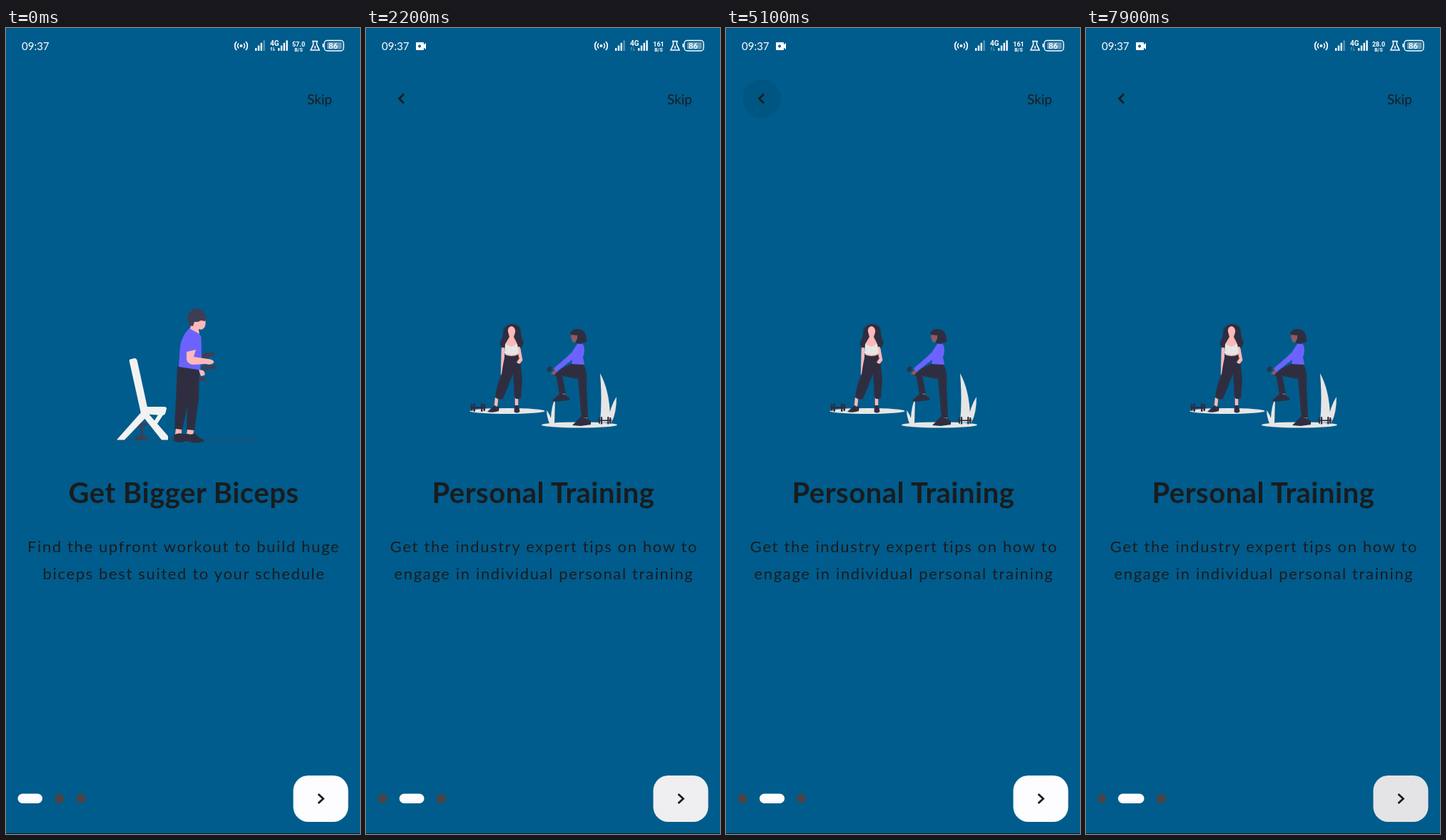
An HTML page that plays this animation: 496 px wide and 1130 px high, repeating every 8 s.

```html
<!DOCTYPE html>
<html lang="en">
<head>
<meta charset="utf-8">
<title>Workout onboarding</title>
<style>
html, body { margin: 0; width: 100%; height: 100%; overflow: hidden; background: #005c8c; }
svg { display: block; width: 100vw; height: 100vh; }
text { font-family: Lato, "Open Sans", sans-serif; fill: #191c1e; }
.title { font-size: 40px; font-weight: 700; letter-spacing: .5px; text-anchor: middle; }
.body { font-size: 22px; letter-spacing: 1.65px; text-anchor: middle; }
.light text { fill: #fff; }
.net text { font: 700 9px Roboto, Inter, sans-serif; }
</style>
</head>
<body>
<svg viewBox="0 0 496 1130" xmlns="http://www.w3.org/2000/svg">
  <defs>
    <g id="weight" fill="#2f2e41">
      <path d="M0 5h22v2H0z"/>
      <rect x="1" y="1" width="2.5" height="10" rx="1"/><rect x="4.5" width="2.5" height="12" rx="1"/>
      <rect x="15" width="2.5" height="12" rx="1"/><rect x="18.5" y="1" width="2.5" height="10" rx="1"/>
    </g>
  </defs>
  <rect width="496" height="1130" fill="#005c8c"/>

  <g id="page0">
    <path d="M147 577.5H351" stroke="#3f3d56" stroke-width=".8"/>
    <g fill="#3f3d56">
      <rect x="183" y="554" width="14" height="4" rx="1.5"/><path d="M188 557h3.5v17H188z"/>
      <rect x="181" y="572.5" width="17" height="5" rx="2"/>
    </g>
    <g fill="#f2f2f2">
      <path d="M173 468Q172 464 176 464L180 463Q183 463 184 467L199 536L189 540Z"/>
      <path d="M190 531H222Q225 531 225 534L223 541Q222 543 219 543L190 541Z"/>
      <path d="M190 538L200 542L166 577.500H155ZM189 541L199 540L227 572V577.500H218ZM214 541H221L210 558L205 555Z"/>
    </g>
    <path fill="#3f3d56" d="M274 459L277 456L290 454Q293 455 291 459L276 464ZM274 473L292 473Q296 474 293 478L275 480ZM270 489L279 490Q282 492 279 495L271 494Z"/>
    <path fill="#2f2e41" d="M240 474L271 479L270 520L264 564L253 563L254 530L247 563L236 562L239 500Z"/>
    <path fill="#ffb8b8" d="M262 410L279 407Q281 417 277 421Q274 424 270 422L271 430L257 423ZM238 562L246 563V570H237ZM254 563L263 564L262 571H253ZM270 479L276 480Q280 483 278 487L273 488Z"/>
    <path fill="#2f2e41" d="M235 571Q240 567 248 569L255 569Q259 571 265 568Q269 574 278 578Q277 582 262 581.500L252 579Q243 583 235 579Z"/>
    <path fill="#6c63ff" d="M257 421Q247 430 244 446L242 475L272 479.500L274 462L273.500 433L271 429Z"/>
    <path fill="#ffb8b8" d="M253 454L266 451L263 461L283 464Q292 465 291 469Q288 473 280 471L262 472Q252 471 253 460Z"/>
    <path fill="#3f3d56" d="M257 417L254 407Q256 394 267 393Q277 394 281 406L279 411L273 410L269 412L264 412L262 418Z"/>
    <text class="title" x="249" y="666">Get Bigger Biceps</text>
    <text class="body" x="249" y="735">Find the upfront workout to build huge</text>
    <text class="body" x="249.500" y="773">biceps best suited to your schedule</text>
  </g>

  <g id="page1">
    <g fill="#e6e6e6">
      <ellipse cx="198" cy="537" rx="52.500" ry="4"/><ellipse cx="299" cy="556.500" rx="53" ry="4"/>
      <path d="M328 484Q343 512 342 553H328Q331 520 328 484ZM351 517Q351 540 344 553H339Q342 530 351 517ZM265 520L264 556L257 554Q253 545 253 536Q258 542 259 547Q260 529 265 520Z"/>
    </g>
    <use href="#weight" x="146" y="526"/>
    <path fill="#2f2e41" d="M204 415Q215 414 217 425Q217 434 221 440Q219 451 211 450L196 449Q186 448 188 440Q193 431 192 425Q194 416 204 415Z"/>
    <g fill="none" stroke="#ffb8b8" stroke-width="4.500" stroke-linecap="round">
      <path d="M192 450L191 485M214 449L217 465L213 470M183 519L182 530M211 517V530"/>
    </g>
    <path fill="#ffb8b8" d="M199 426Q198 419 204 418Q210 420 209 427L207 433L212 443L213 460H195V443L201 433Z"/>
    <path fill="#e6e6e6" d="M195 443L204 447L212 443L214 456Q204 460 194 456Z"/>
    <path fill="#2f2e41" d="M195 458Q204 462 213 458Q218 473 219 493L217 519Q212 522 208 518L206 485L192 520Q186 522 181 518Q183 500 190 485Q192 470 195 458ZM170 538L180 529Q184 532 187 530L186 537Q178 540 170 538ZM208 529H214L215.500 538Q211 541 207.500 538Z"/>
    <path fill="#ffb8b8" d="M214 464L219 466L215 471L211 469Z"/>
    <g transform="rotate(35 261 481)"><use href="#weight" transform="translate(253 476.500) scale(.75)"/></g>
    <path fill="#8b5b62" d="M287 430H296V439L292 441Q287 440 287 430ZM259 484L266 477L269 481L263 487ZM272 509H279V515H272ZM302 543H310V550H302Z"/>
    <path fill="#2f2e41" d="M286 430Q287 421 298 422Q307 423 308 432L310 439Q302 444 293 441Q297 436 296 431Z"/>
    <path fill="#6c63ff" d="M296 443H304Q308 452 304 461L306 472L288 473L289 465L267 482L263 477Q280 463 288 455Z"/>
    <path fill="#2f2e41" d="M288 471L305 472Q311 483 309 500L311 546H302L297 492L275 488L280 512L271 513L266 485Q275 475 288 471ZM261 522L272 512L280 515L286 520L284 522L264 524ZM289 557L301 545L310 548L315 551V556L301 558Z"/>
    <use href="#weight" transform="translate(325 545) scale(.88)"/>
    <text class="title" x="248.500" y="666">Personal Training</text>
    <text class="body" x="249.500" y="735">Get the industry expert tips on how to</text>
    <text class="body" x="249.500" y="773">engage in individual personal training</text>
  </g>

  <circle id="backInk" cx="50" cy="99" r="27"/>
  <path id="back" d="M53 92.500L46.500 99L53 105.500" fill="none" stroke="#191c1e" stroke-width="2.700"/>
  <text x="422" y="107" font-size="19">Skip</text>

  <g class="light" fill="#fff">
    <text x="22" y="31" font-size="15">09:37</text>
    <path id="camera" fill-rule="evenodd" d="M71 20h9q1 0 1 1v2.500l3-2.500v9l-3-2.500V30q0 1-1 1h-9q-1 0-1-1v-9q0-1 1-1zM75 23.500a2 2 0 1 0 .1 0z"/>
    <g id="icons">
      <circle cx="329.500" cy="25" r="2"/>
      <path d="M326 21.500a5 5 0 0 0 0 7M333 21.500a5 5 0 0 1 0 7M323 19a9 9 0 0 0 0 12M336 19a9 9 0 0 1 0 12" fill="none" stroke="#fff" stroke-width="1.700"/>
      <g id="signal"></g>
      <g class="net">
        <text x="370" y="25" style="font-size:10px">4G</text>
        <text id="speed" x="410" y="25.500" text-anchor="middle"></text>
        <text x="410" y="33" text-anchor="middle" style="font-size:7px">B/S</text>
      </g>
      <path id="arrows" d="M372 32v-5l-1.500 2M375 27v5l1.500-2" fill="none" stroke="#fff"/>
      <path d="M429 18.500h8M430.500 19v4.500L427 31h12l-3.500-7.500V19M433 25v4" fill="none" stroke="#fff" stroke-width="1.600"/>
      <rect x="446" y="17.500" width="27" height="14.500" rx="4" fill="none" stroke="#fff" stroke-width="1.400"/>
      <rect x="443.500" y="22" width="1.500" height="5"/>
      <rect x="450" y="20" width="20.500" height="9.500" rx="1.500" opacity=".4"/>
      <text x="458.500" y="29" font-size="11" font-weight="700" text-anchor="middle">86</text>
    </g>
    <g id="mic">
      <rect id="micPill" y="13.500" height="22.500" rx="11.200" fill="#30c680"/>
      <g id="micIcon"><rect x="449.500" y="17" width="5" height="9" rx="2.500"/>
        <path d="M446.700 23.500a5.300 5 0 0 0 10.600 0M452 28.500v3.500" fill="none" stroke="#fff" stroke-width="1.500"/></g>
    </g>
  </g>

  <g id="dots"></g>
  <rect x="402.500" y="1048" width="77" height="65" rx="21" fill="#fdfcff"/>
  <rect id="nextInk" x="402.500" y="1048" width="77" height="65" rx="21"/>
  <path d="M437.500 1074L444.500 1080.500L437.500 1087" fill="none" stroke="#191c1e" stroke-width="2.800"/>
  <g id="touch" fill="#fff"><circle r="17" opacity=".1"/><circle r="14.500" opacity=".34"/></g>
  <path d="M0 1129.500H496" stroke="#06131c"/>
</svg>
<script>
const LOOP = 8000, WIDTH = 496;
const $ = id => document.getElementById(id);
const set = (el, attrs) => { for (const k in attrs) el.setAttribute(k, attrs[k]); };
const make = (parent, tag, attrs) => {
  const el = document.createElementNS('http://www.w3.org/2000/svg', tag);
  set(el, attrs);
  return parent.appendChild(el);
};
const show = (id, on) => set($(id), { opacity: +on });
const clamp = x => Math.min(1, Math.max(0, x));
const ramp = (t, a, b) => clamp((t - a) / (b - a));
const smooth = x => x * x * (3 - 2 * x);
const outBack = x => 1 + 2.70158 * (x - 1) ** 3 + 1.70158 * (x - 1) ** 2;

const drags = [
  { start: 150, end: 950, reach: 148, y: 870 },
  { start: 2450, end: 2700, reach: 125, y: 866 }
];
const taps = [
  { down: 1600, up: 1750, from: 0, to: 1, x: 445, y: 1086 },
  { down: 3500, up: 3620, from: 1, to: 2, x: 443, y: 1100 },
  { down: 4590, up: 4670, from: 2, to: 1, x: 50, y: 100, back: true },
  { down: 5490, up: 5600, from: 1, to: 0, x: 50, y: 100, back: true },
  { down: 7490, up: 7600, from: 0, to: 1, x: 441, y: 1086 }
];

for (const left of [349, 381]) {
  for (let i = 0; i < 4; i++) {
    const h = 4 + i * 3.6;
    make($('signal'), 'rect', { x: left + i * 3.8, y: 32 - h, width: 2.4, height: h, rx: .8, opacity: left === 349 && i === 3 ? .35 : 1 });
  }
}
const dots = [0, 1, 2].map(() => make($('dots'), 'rect', { y: 1073.5, height: 13.5, rx: 6.75 }));

function dragOffset(t) {
  let sum = 0;
  for (const d of drags) {
    if (t < d.start) continue;
    const s = Math.max(0, t - d.end) * .02;
    sum -= d.reach * smooth(ramp(t, d.start, d.end - 50)) * (1 + s) * Math.exp(-s);
  }
  return Math.abs(sum) < .1 ? 0 : sum;
}

function drawPages(t, page) {
  const x = dragOffset(t);
  // The middle artwork stays up while the last dot is active.
  const shown = Math.min(page, 1);
  [0, 1].forEach(i => {
    set($('page' + i), { transform: `translate(${(i - shown) * WIDTH + x} 0)` });
    show('page' + i, i === shown || (x < 0 && i > shown));
  });
  show('back', page > 0);
}

function drawDots(t, tap, page) {
  const k = tap ? outBack(ramp(t, tap.up, tap.up + 500)) : 1;
  const from = tap ? tap.from : page;
  let x = 16.5;
  dots.forEach((dot, i) => {
    const a = +(i === from), b = +(i === page), on = a + (b - a) * k;
    const width = 13.5 + 21 * on, c = clamp(on);
    const mix = (p, q) => Math.round(p + (q - p) * c);
    set(dot, { x, width, fill: `rgb(${mix(72, 253)},${mix(68, 252)},${mix(71, 255)})` });
    x += width + 17;
  });
}

function ink(t, tap) {
  const fade = .1 * (650 - (t - tap.up)) / 350;
  return ramp(t, tap.down, tap.down + 80) * Math.min(.12, Math.max(0, fade));
}

function drawTouch(t) {
  let next = 0, back = 0, x = 0, y = 0, alpha = 0;
  for (const p of taps) {
    if (t < p.down) continue;
    if (p.back) back = ink(t, p); else next = ink(t, p);
    if (t < p.up) { x = p.x; y = p.y; alpha = 1; }
  }
  for (const d of drags) {
    if (t < d.start || t >= d.end) continue;
    x = 349 - d.reach * smooth(ramp(t, d.start, d.end - 50));
    y = d.y;
    alpha = 1;
  }
  set($('nextInk'), { opacity: next });
  set($('backInk'), { opacity: back });
  set($('touch'), { transform: `translate(${x} ${y})`, opacity: alpha });
}

function drawStatus(t) {
  const mic = smooth(ramp(t, 150, 400)) * (1 - smooth(ramp(t, 1700, 2000)));
  const width = 44 * mic;
  show('camera', t >= 100);
  show('icons', t < 150 || t >= 2000);
  show('mic', mic > 0);
  set($('micPill'), { x: 474 - width, width });
  set($('micIcon'), { opacity: ramp(mic, .6, 1) });
  $('speed').textContent = t < 2000 ? '57.0' : t < 6400 ? '161' : '28.0';
  set($('arrows'), { opacity: t < 2000 || (t >= 6400 && t < 6900) ? 1 : .35 });
}

function draw(t) {
  const tap = taps.filter(p => t >= p.up).pop();
  const page = tap ? tap.to : 0;
  drawPages(t, page);
  drawDots(t, tap, page);
  drawTouch(t);
  drawStatus(t);
}

const began = performance.now();
function tick() {
  draw((performance.now() - began) % LOOP);
  requestAnimationFrame(tick);
}
tick();
</script>
</body>
</html>
```
